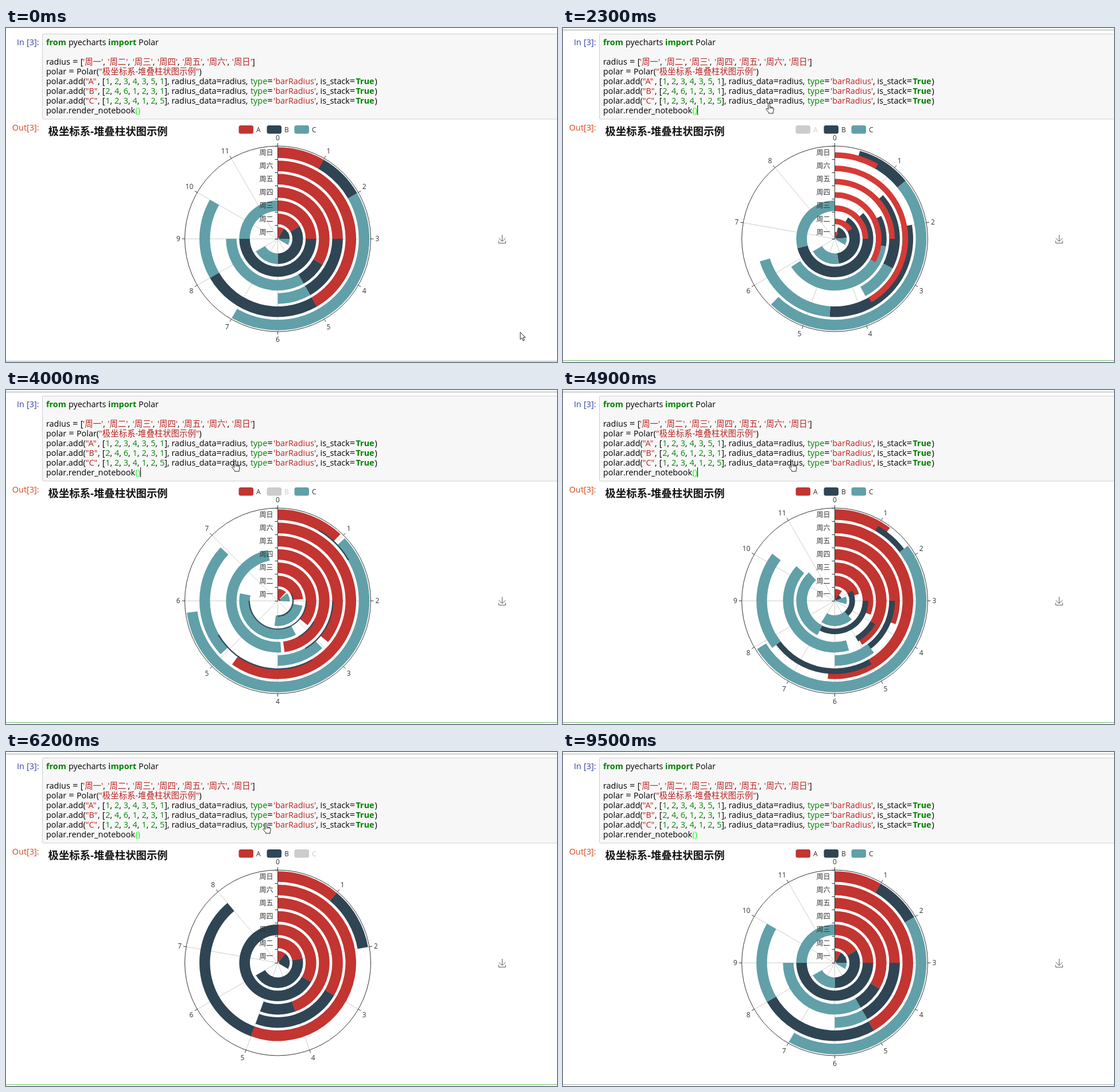
Write an HTML page that moves like this. It is 960 by 583 pixels and loops after 9.6 s.

```html
<!DOCTYPE html>
<html lang="zh">
<head>
<meta charset="utf-8">
<title>Polar stacked bars</title>
<style>
html, body { margin: 0; width: 100%; height: 100%; overflow: hidden; background: #fff; }
svg { display: block; width: 960px; height: 583px; }
text { font-family: "Open Sans", "Noto Sans CJK SC", "Noto Sans CJK", sans-serif; white-space: pre; }
.code { font-size: 14.4px; word-spacing: 0.5px; }
.label { font-size: 12px; fill: #333; }
.str { fill: #ba2121; }
.num { fill: #080; }
.builtin { fill: #008000; }
.kw { fill: #008000; font-weight: bold; }
.op { font-size: 16.5px; }
.match { fill: #0f0; }
</style>
</head>
<body>
<svg viewBox="0 0 960 583">
  <rect x="63.5" y="10.5" width="910" height="148.5" rx="2" fill="#f7f7f7" stroke="#cfcfcf"/>
  <g id="code"></g>
  <text class="code" x="57.5" y="30" text-anchor="end" fill="#303f9f">In [3]:</text>
  <text class="code" x="57.5" y="179" text-anchor="end" fill="#d84315">Out[3]:</text>
  <text x="73.5" y="186.5" font-size="18.4" font-weight="bold" fill="#111">极坐标系-堆叠柱状图示例</text>
  <path d="M858.5 367l6 5.5 6-5.5M858.5 371.5v4h12v-4M864.5 372v-11" fill="none" stroke="#5c5c5c"/>
  <g id="chart"></g>
  <g id="frame"></g>
  <path id="caret" d="M234.5 135v17" stroke="#000"/>
  <path id="arrow" d="M0 0V12.6L2.9 9.9 5.1 15 7.2 14.1 5 9.2H9Z" fill="#fff" stroke="#222"/>
  <g id="hand" fill="#fff" stroke="#222">
    <path d="M-1.5 1.5a1.4 1.4 0 0 1 2.8 0V6.5l5 1.2q1.6.5 1.6 2.2V13q0 1-.8 2.4V18H-.5V16.5L-4.8 11.6Q-5.8 10.2-4.5 9.5-3.4 9-1.5 11.3Z"/>
    <path d="M1.3 6.5V9.5M3.6 7.2V9.7M5.8 7.7V10" fill="none"/>
  </g>
</svg>
<script>
const LOOP = 9600, STEP = 100, ANIM = 300;
const CX = 473.5, CY = 368, R = 162, BAND = R / 7;
const days = [...'一二三四五六日'].map(d => '周' + d);
const series = [
  { name: 'A', color: '#c23531', hover: '#d53a36', x: 405.5, data: [1, 2, 3, 4, 3, 5, 1] },
  { name: 'B', color: '#2f4554', hover: '#344c5c', x: 454.5, data: [2, 4, 6, 1, 2, 3, 1] },
  { name: 'C', color: '#61a0a8', hover: '#6bb0b9', x: 502.5, data: [1, 2, 3, 4, 1, 2, 5] }
];
// Legend clicks: time, series, new state
const clicks = [
  { at: 2243, s: 0, on: false }, { at: 3100, s: 0, on: true },
  { at: 3850, s: 1, on: false }, { at: 4833, s: 1, on: true },
  { at: 5650, s: 2, on: false }, { at: 6878, s: 2, on: true }
];
const hoverStart = [1900, 3700, 5500];
const editing = [[2300, 2900], [3100, 3700], [3900, 4600], [4900, 5500], [5700, 6500], [6900, 9500]];
// Pointer tip: time, x, y
const pointer = [
  [400, 896, 531], [600, 888, 534], [800, 800, 430], [1000, 650, 260], [1200, 500, 105],
  [1300, 450, 76], [1400, 420, 86], [1900, 359, 131], [3100, 359, 131], [3200, 360, 131],
  [3400, 360, 131], [3700, 399, 124], [5200, 399, 124], [5500, 453, 124], [7200, 453, 124],
  [7500, 510, 260], [7800, 590, 470], [8200, 640, 600], [8300, 60, 600], [8500, 24, 566], [8600, 2, 600]
];

const $ = id => document.getElementById(id);
const lerp = (a, b, p) => a + (b - a) * p;
const clamp = v => Math.min(1, Math.max(0, v));
const cubicOut = p => 1 - (1 - p) ** 3;
const at = (r, deg) => {
  const a = deg * Math.PI / 180;
  return [CX + r * Math.sin(a), CY - r * Math.cos(a)];
};
const pt = (r, deg) => at(r, deg).map(v => v.toFixed(2)).join(' ');
const label = (x, y, text, anchor = 'start', fill = '#333') =>
  `<text class="label" x="${x}" y="${y + 4.3}" text-anchor="${anchor}" style="fill:${fill}">${text}</text>`;

function drawCode() {
  const span = (cls, text, x) => `<tspan class="${cls}"${x ? ` x="${x}"` : ''}>${text}</tspan>`;
  const line = (n, body) => `<text class="code" x="70" y="${30 + 17 * n}">${body}</text>`;
  const equals = span('op', '=');
  const addCall = s => 'polar.add(' + span('str', `"${s.name}"`) + span('', ', [', 160) +
    s.data.map((v, i) => span('num', v, 173.2 + 15.8 * i) + (i < 6 ? ',' : '], ')).join('') +
    span('', 'radius_data', 288.5) + equals + 'radius,' +
    span('builtin', 'type', 426) + equals + span('str', "'barRadius'", 466) + ', ' +
    span('', 'is_stack', 547.5) + equals + span('kw', 'True', 609.5) + span('', ')', 642.5);
  $('code').innerHTML =
    line(0, span('kw', 'from') + span('', 'pyecharts', 109) + span('kw', 'import', 178) + span('', 'Polar', 231)) +
    line(2, `radius ${equals} [` + days.map((d, i) =>
      span('str', `'${d}'`, 134 + 43.3 * i) + (i < 6 ? ',' : ']')).join('')) +
    line(3, `polar ${equals} Polar(` + span('str', '"极坐标系-堆叠柱状图示例"') + ')') +
    series.map((s, i) => line(4 + i, addCall(s))).join('') +
    line(7, 'polar.render_notebook' + span('match', '()', 225.4));
}

// Start and end angles of every bar for the visible series
function layout(shown) {
  const sums = days.map(() => 0);
  const spans = series.map((s, k) => s.data.map((v, i) => {
    const from = sums[i];
    if (shown[k]) sums[i] += v;
    return [from, sums[i]];
  }));
  const max = Math.max(...sums);
  return { max, angles: spans.map(row => row.map(ab => ab.map(v => v / max * 360))) };
}

function sector(r0, r, a, b) {
  const big = b - a > 180 ? 1 : 0;
  return `M${pt(r0, a)}L${pt(r, a)}A${r} ${r} 0 ${big} 1 ${pt(r, b)}` +
    `L${pt(r0, b)}A${r0} ${r0} 0 ${big} 0 ${pt(r0, a)}Z`;
}

function bars(k, angles, size, color) {
  if (size <= 0) return '';
  const d = angles.map(([a, b], i) => {
    const r0 = BAND * (i + 0.1);
    return sector(r0, r0 + BAND * 0.8 * size, a, b);
  }).join('');
  return `<path d="${d}" fill="${color}"/>`;
}

function angleLabel(n, deg) {
  const [x, y] = at(R + 8, deg);
  const dx = (x - CX) / (R + 8), dy = (y - CY) / (R + 8);
  const anchor = Math.abs(dx) < 0.3 ? 'middle' : dx > 0 ? 'start' : 'end';
  const shift = Math.abs(dy) < 0.3 ? 0 : dy > 0 ? 6 : -6;
  return label(x, y + shift, n, anchor);
}

function drawChart(t) {
  const now = [true, true, true];
  let before = [...now], click = null;
  for (const c of clicks) {
    if (c.at > t) break;
    before = [...now];
    now[c.s] = c.on;
    click = c;
  }
  const p = click ? cubicOut(clamp((t - click.at) / ANIM)) : 1;
  const old = layout(before), next = layout(now);

  const order = [0, 1, 2];
  if (click && (click.s === 0 || !click.on)) order.push(...order.splice(click.s, 1));
  const drawn = order.map(k => {
    const hot = t >= hoverStart[k] && t < clicks[2 * k + 1].at;
    const color = hot ? series[k].hover : series[k].color;
    if (before[k] && now[k]) {
      const mid = next.angles[k].map((ab, i) => ab.map((v, j) => lerp(old.angles[k][i][j], v, p)));
      return bars(k, mid, 1, color);
    }
    return now[k] ? bars(k, next.angles[k], p, color) : bars(k, old.angles[k], 1 - p, color);
  }).join('');

  let rays = '', ticks = '', labels = '';
  for (let n = 0; n < next.max; n++) {
    const deg = n / next.max * 360;
    rays += `M${CX} ${CY}L${pt(R, deg)}`;
    ticks += `M${pt(R, deg)}L${pt(R + 5, deg)}`;
    labels += angleLabel(n, deg);
  }
  for (let i = 0; i <= 7; i++) ticks += `M${CX} ${Math.floor(CY - i * BAND) + 0.5}h-5`;
  days.forEach((d, i) => labels += label(CX - 8, CY - (i + 0.5) * BAND, d, 'end'));
  const legend = series.map((s, k) =>
    `<rect x="${s.x}" y="170" width="25.5" height="14.5" rx="3.5" fill="${now[k] ? s.color : '#ccc'}"/>` +
    label(s.x + 30.5, 177.5, s.name, 'start', now[k] ? '#333' : '#ccc')).join('');

  $('chart').innerHTML = `<path d="${rays}" stroke="#ccc"/>${drawn}` +
    `<g fill="none" stroke="#333"><circle cx="${CX}" cy="${CY}" r="${R}"/>` +
    `<path d="M${CX} ${CY}V${CY - R}${ticks}"/></g>${labels}${legend}`;
}

function drawCell(t) {
  const edit = editing.find(([a, b]) => t >= a && t < b);
  const rule = (y, color) => `<rect y="${y}" width="960" height="1" fill="${color}"/>`;
  $('frame').innerHTML = t < 2300 ? rule(581, '#ababab')
    : rule(3, edit ? '#9aa89b' : '#ababab') + rule(580, edit ? '#66bb6a' : '#ababab');
  const lit = edit && Math.floor((t - edit[0] + 30) / 530) % 2 === 0;
  $('caret').style.display = lit ? '' : 'none';
}

function drawPointer(t) {
  let i = pointer.findIndex(k => k[0] > t);
  if (i < 0) i = pointer.length - 1;
  const b = pointer[i], a = pointer[Math.max(0, i - 1)];
  const p = b === a ? 0 : clamp((t - a[0]) / (b[0] - a[0]));
  const isHand = t >= 1900 && t < 7300;
  const spot = `translate(${lerp(a[1], b[1], p)} ${lerp(a[2], b[2], p)})`;
  for (const id of ['arrow', 'hand']) {
    $(id).setAttribute('transform', spot);
    $(id).style.display = (id === 'hand') === isHand ? '' : 'none';
  }
}

let shownAt = -1;
function tick(time) {
  const t = Math.floor(time % LOOP / STEP) * STEP;
  if (t !== shownAt) {
    shownAt = t;
    drawChart(t);
    drawCell(t);
    drawPointer(t);
  }
}
function loop() {
  tick(performance.now());
  requestAnimationFrame(loop);
}
drawCode();
loop();
</script>
</body>
</html>
```
